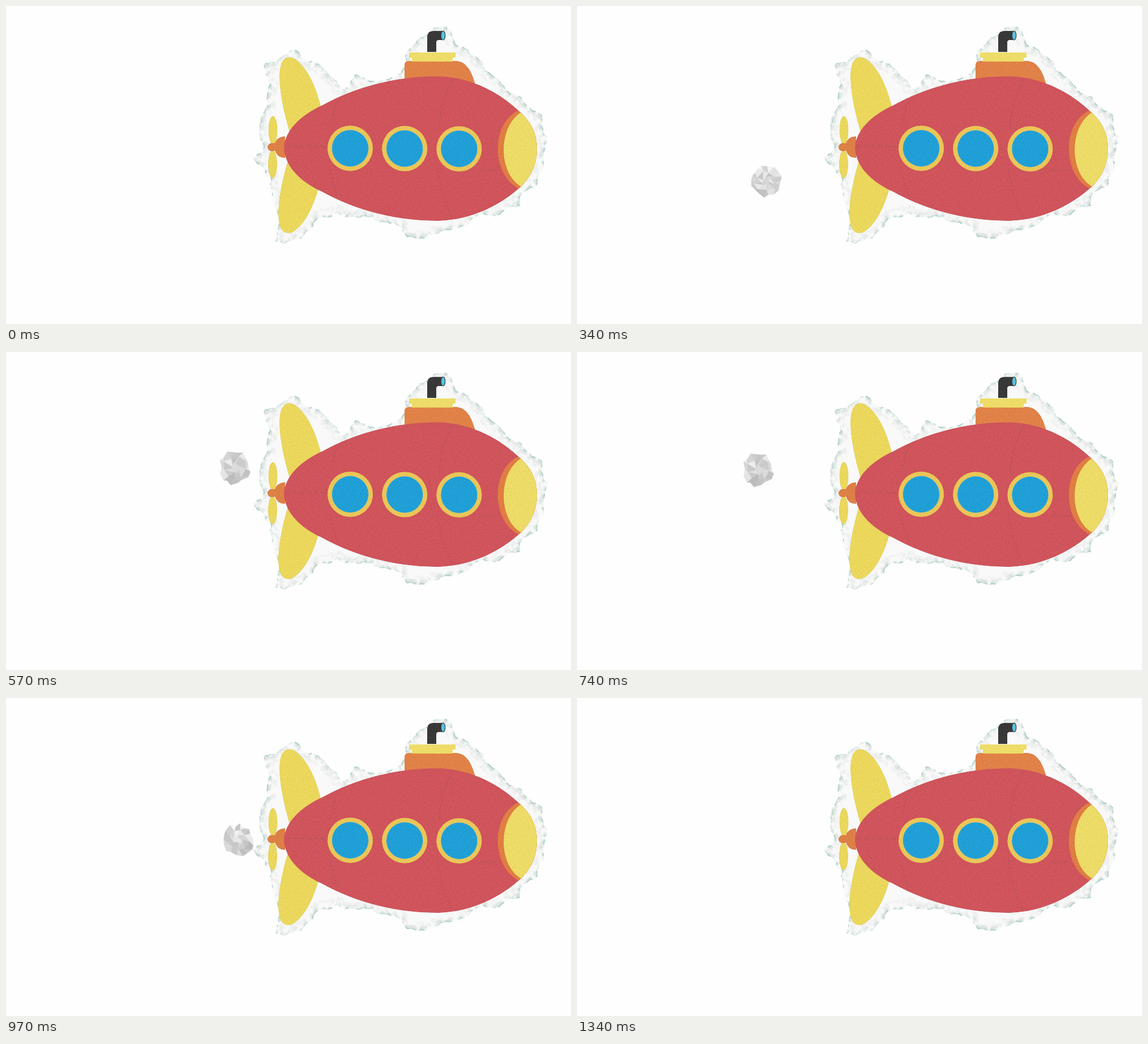
An HTML page for the animation above (1.37 s loop, 998 by 561 pixels).

```html
<!DOCTYPE html>
<html lang="en">
<head>
<meta charset="utf-8">
<title>Paper submarine</title>
<style>
html, body { margin: 0; width: 100%; height: 100%; overflow: hidden; background: #fefefe; }
svg { display: block; width: 100%; height: 100%; }
</style>
</head>
<body>
<svg viewBox="0 0 998 561" xmlns="http://www.w3.org/2000/svg">
  <defs>
    <filter id="grain" filterUnits="userSpaceOnUse" x="0" y="0" width="998" height="561" color-interpolation-filters="sRGB">
      <feTurbulence type="fractalNoise" baseFrequency=".55" numOctaves="2" seed="4"/>
      <feColorMatrix values="1 0 0 0 0  1 0 0 0 0  1 0 0 0 0  0 0 0 0 1" result="n"/>
      <feComposite in="SourceGraphic" in2="n" operator="arithmetic" k2="1" k3=".12" k4="-.06"/>
      <feComposite in2="SourceAlpha" operator="in"/>
    </filter>
    <filter id="pulp" filterUnits="userSpaceOnUse" x="0" y="0" width="998" height="561" color-interpolation-filters="sRGB">
      <feTurbulence type="fractalNoise" baseFrequency=".1" numOctaves="5" seed="9"/>
      <feColorMatrix values="0 0 0 0 0  0 0 0 0 0  0 0 0 0 0  0 0 0 4 -1.6" result="n"/>
      <feComposite in="SourceGraphic" in2="n" operator="in"/>
    </filter>
    <clipPath id="inPaper"><path class="paper"/></clipPath>
    <clipPath id="inHull"><use href="#hull"/></clipPath>
  </defs>

  <g clip-path="url(#inPaper)">
    <path class="paper" fill="#f8f9f8"/>
    <g filter="url(#pulp)" fill="none">
      <path class="paper" stroke="#edefee" stroke-width="30"/>
      <path class="paper" stroke="#dfe4e2" stroke-width="14"/>
      <path class="paper" stroke="#b3d2c8" stroke-width="5"/>
    </g>
  </g>

  <g filter="url(#grain)">
    <g fill="#ead75c">
      <path id="fin" d="M505 235C484 170 480 125 485 106C489 88 502 87 513 95C535 112 550 148 558 185Z"/>
      <use href="#fin" transform="matrix(1 0 0 -1 -2 491)"/>
      <ellipse cx="471.500" cy="219" rx="8" ry="25"/>
      <ellipse cx="471" cy="279" rx="8" ry="25"/>
    </g>
    <path fill="#dd8046" d="M493 230C482 230 477 236 475 242C468 240 462 244 462 249C462 255 468 258 475 255C478 264 484 268 493 268Z"/>
    <path fill="#e08247" d="M704 130V104Q704 97 711 97H797C812 99 822 112 829 139Z"/>
    <path fill="#eddc68" d="M712 82H794V91H789V98H717V91H712Z"/>
    <path fill="#383839" d="M744 81V55Q744 44 755 44H772V60H765Q760 60 760 65V81Z"/>
    <ellipse cx="772" cy="52" rx="3.800" ry="8.200" fill="#55c3df" stroke="#383839" stroke-width="1.300"/>
    <path id="hull" fill="#cf545b" d="M491 250C492 215 530 188 557 176C620 141 690 124 765 124C825 126 875 155 908 187C928 205 938 225 938 251C938 278 928 302 908 320C875 350 825 377 765 379C690 379 620 362 557 327C530 315 492 288 491 250Z"/>
    <g clip-path="url(#inHull)">
      <path fill="#df7d43" d="M906 184C856 205 856 300 908 323L950 300V200Z"/>
      <path fill="#ecdb66" d="M911 187C868 212 869 297 911 319L950 300V200Z"/>
      <g fill="none" stroke="#8a5560" stroke-opacity=".3" stroke-width="1.500" stroke-dasharray="9 3">
        <path d="M495 248H566M836 289H868M587 164Q577 188 574 212M572 288Q577 312 586 335"/>
        <path d="M790 128Q769 162 765 216M762 285Q769 340 788 374"/>
      </g>
    </g>
    <g id="windows"></g>
  </g>
  <g id="balls"></g>
</svg>
<script>
const NS = 'http://www.w3.org/2000/svg';
const LOOP = 1370, HOLD = 170, LIFE = 370, CYCLE = 400;
const byId = id => document.getElementById(id);

function random(seed) {
  return () => {
    seed = (seed * 1664525 + 1013904223) % 4294967296;
    return seed / 4294967296;
  };
}

function toPath(list) {
  return 'M' + list.map(p => p.map(v => v.toFixed(1)).join(' ')).join('L') + 'Z';
}

function add(parent, tag, attrs) {
  const el = document.createElementNS(NS, tag);
  for (const k in attrs) el.setAttribute(k, attrs[k]);
  return parent.appendChild(el);
}

// Split an edge at a shifted midpoint until the pieces are short.
function tear(a, b, rnd) {
  const dx = b[0] - a[0], dy = b[1] - a[1];
  if (Math.hypot(dx, dy) < 5) return [a];
  const k = (rnd() - .5) * .3;
  const mid = [(a[0] + b[0]) / 2 - dy * k, (a[1] + b[1]) / 2 + dx * k];
  return [...tear(a, mid, rnd), ...tear(mid, b, rnd)];
}

// Corners of the torn sheet, clockwise from the periscope.
const corners = `738,53 764,37 787,42 794,67 844,99 846,113 909,159 944,189 957,235 949,288
  908,341 909,353 838,367 772,397 708,408 686,384 630,371 587,366 548,378 508,414 475,416 480,394
  472,340 468,305 436,268 455,248 450,196 466,139 455,102 511,77 545,98 597,147 616,121 668,131
  697,119 706,83`.split(/\s+/).map(p => p.split(',').map(Number));
const rip = random(7);
const sheet = toPath(corners.flatMap((p, i) => tear(p, corners[(i + 1) % corners.length], rip)));
document.querySelectorAll('.paper').forEach(el => el.setAttribute('d', sheet));

for (let i = 0; i < 3; i++) {
  const at = { cx: 608 + 96.2 * i, cy: 251 + i / 2 };
  add(byId('windows'), 'circle', { ...at, r: 40, fill: '#eac657' });
  add(byId('windows'), 'circle', { ...at, r: 32.5, fill: '#209fd6', stroke: '#d9cf83', 'stroke-width': .6 });
}

// A crumpled ball: rings of flat facets, lit from the upper left.
function crumple(w, h, seed) {
  const g = add(byId('balls'), 'g', {});
  const rnd = random(seed), n = 18;
  const ring = (lo, hi, turn) => Array.from({ length: n }, (_, i) => {
    const a = (i + turn + (rnd() - .5) * .7) / n * 2 * Math.PI;
    const r = lo + (hi - lo) * rnd();
    return [w / 2 * (1 + r * Math.cos(a)), h / 2 * (1 + r * Math.sin(a))];
  });
  const facet = list => {
    const [x, y] = list[0];
    const v = Math.round(214 - 14 * (x / w + y / h - 1) + (rnd() - .5) * 52);
    const fill = `rgb(${v},${v},${v})`;
    add(g, 'path', { d: toPath(list), fill, stroke: fill, 'stroke-width': .6 });
  };
  const rim = ring(.82, 1.06, 0), fold = ring(.5, .78, .5), core = ring(.12, .3, 0);
  for (let i = 0; i < n; i += 2) {
    const j = i + 1, k = (i + 2) % n;
    facet([rim[i], rim[j], fold[i]]);
    facet([rim[j], rim[k], fold[k], fold[i]]);
    facet([fold[i], fold[k], core[i]]);
    facet([fold[k], core[k], core[i]]);
  }
  facet(core.filter((_, i) => i % 2 === 0));
  return g;
}

const balls = [
  { x: 389, y: 278, el: crumple(58, 55, 12) },
  { x: 377, y: 174, el: crumple(55, 60, 31) },
  { x: 380, y: 222, el: crumple(58, 57, 58) }
];

function draw(t) {
  balls.forEach((b, i) => {
    const age = t - HOLD - CYCLE * i, step = Math.floor(age / HOLD);
    b.el.setAttribute('visibility', age >= 0 && age < LIFE ? 'visible' : 'hidden');
    b.el.setAttribute('transform', `translate(${b.x - 84.2 * step} ${b.y + 3.5 * step})`);
  });
}

const start = performance.now();
function tick() {
  draw((performance.now() - start) % LOOP);
  requestAnimationFrame(tick);
}
tick();
</script>
</body>
</html>
```
